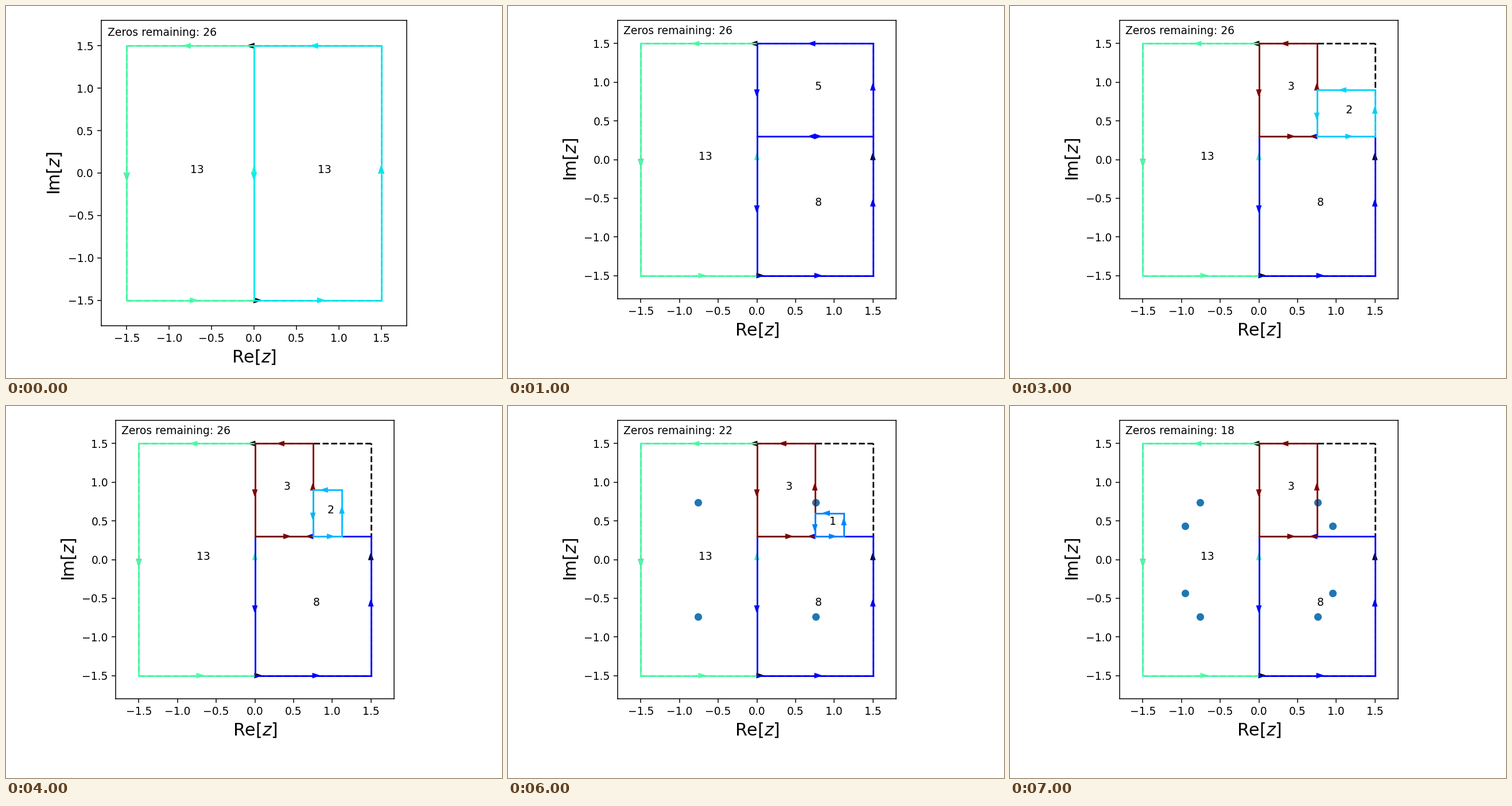
A matplotlib script that plays this animation: 864x648 px, repeating every 8000 ms.

```python
import numpy as np
import matplotlib.pyplot as plt
from matplotlib.animation import FuncAnimation

W, H, DPI = 864, 648, 135
HEAD = 0.08  # arrow head length in data units
LIM = 1.8

# Zeros of z^26 - 2 z^10 + z^6 / 2 - 1
coeffs = np.zeros(27)
coeffs[[0, 16, 20, 26]] = 1, -2, 0.5, -1
ROOTS = np.roots(coeffs)

jet = plt.get_cmap("jet")
OUTER = (-1.5, 1.5, -1.5, 1.5)

# Boxes: x0, x1, y0, y1, number of zeros, colormap index
LEFT = (-1.5, 0, -1.5, 1.5, 13, 113)
RIGHT = (0, 1.5, -1.5, 1.5, 13, 91)
LOWER = (0, 1.5, -1.5, 0.3, 8, 30)
UPPER = (0, 1.5, 0.3, 1.5, 5, 30)
THREE = (0, 0.75, 0.3, 1.5, 3, 255)
TWO = (0.75, 1.5, 0.3, 1.5, 2, 196)
TWO_LOW = (0.75, 1.5, 0.3, 0.9, 2, 85)
TWO_SLIM = (0.75, 1.125, 0.3, 0.9, 2, 79)
ONE_LOW = (0.75, 1.125, 0.3, 0.6, 1, 65)
ONE_HIGH = (0.75, 1.125, 0.6, 0.9, 1, 73)

BASE = [LEFT, LOWER, THREE]
# Each step: boxes still to search, approximate zeros found so far
STEPS = [
    ([LEFT, RIGHT], []),
    ([LEFT, LOWER, UPPER], []),
    (BASE + [TWO], []),
    (BASE + [TWO_LOW], []),
    (BASE + [TWO_SLIM], []),
    (BASE + [ONE_LOW, ONE_HIGH], []),
    (BASE + [ONE_LOW], [0.76 + 0.74j]),
    (BASE, [0.76 + 0.74j, 0.95 + 0.43j]),
]

fig = plt.figure(figsize=(W / DPI, H / DPI), dpi=DPI)
ax = fig.add_axes([0, 0, 1, 1])


def place_axes(left, top, size):
    ax.set_position([left / W, 1 - (top + size) / H, size / W, size / H])


def draw_box(box, color, style="-"):
    """Draw a counter-clockwise rectangle with an arrow on every side."""
    x0, x1, y0, y1 = box
    corners = np.array([(x0, y0), (x1, y0), (x1, y1), (x0, y1), (x0, y0)])
    for a, b in zip(corners[:-1], corners[1:]):
        ax.plot([a[0], b[0]], [a[1], b[1]], style, color=color, lw=1.5)
        mid = (a + b) / 2
        step = 1e-6 * (b - a) / np.hypot(*(b - a))
        ax.arrow(*mid, *step, head_length=HEAD, head_width=HEAD * 2 / 3,
                 fc=color, ec=color)


def draw_zeros(guesses):
    """Plot each zero with its mirror images; return how many were drawn."""
    points = []
    for guess in guesses:
        z = ROOTS[np.argmin(abs(ROOTS - guess))]
        points += [z, -z, z.conjugate(), -z.conjugate()]
    points = np.array(points, dtype=complex)
    ax.plot(points.real, points.imag, "o", color="C0", ms=6, mew=1, zorder=1)
    return len(points)


def draw(i):
    ax.clear()
    if i == 0:
        place_axes(166, 25, 532)
    else:
        place_axes(191, 25, 485)
    boxes, guesses = STEPS[i]

    draw_box(OUTER, "black", "--")
    found = draw_zeros(guesses)
    for *box, count, shade in boxes:
        draw_box(box, jet(shade))
        ax.text((box[0] + box[1]) / 2, (box[2] + box[3]) / 2, str(count))
    ax.text(0.02, 0.95, f"Zeros remaining: {26 - found}",
            transform=ax.transAxes)

    ticks = np.arange(-1.5, 1.6, 0.5)
    ax.set(xlim=(-LIM, LIM), ylim=(-LIM, LIM), xticks=ticks, yticks=ticks)
    ax.set_xlabel("Re[$z$]", size=16)
    ax.set_ylabel("Im[$z$]", size=16)
    return []


anim = FuncAnimation(fig, draw, frames=len(STEPS), interval=1000, repeat=True,
                     repeat_delay=0)
plt.show()
```
